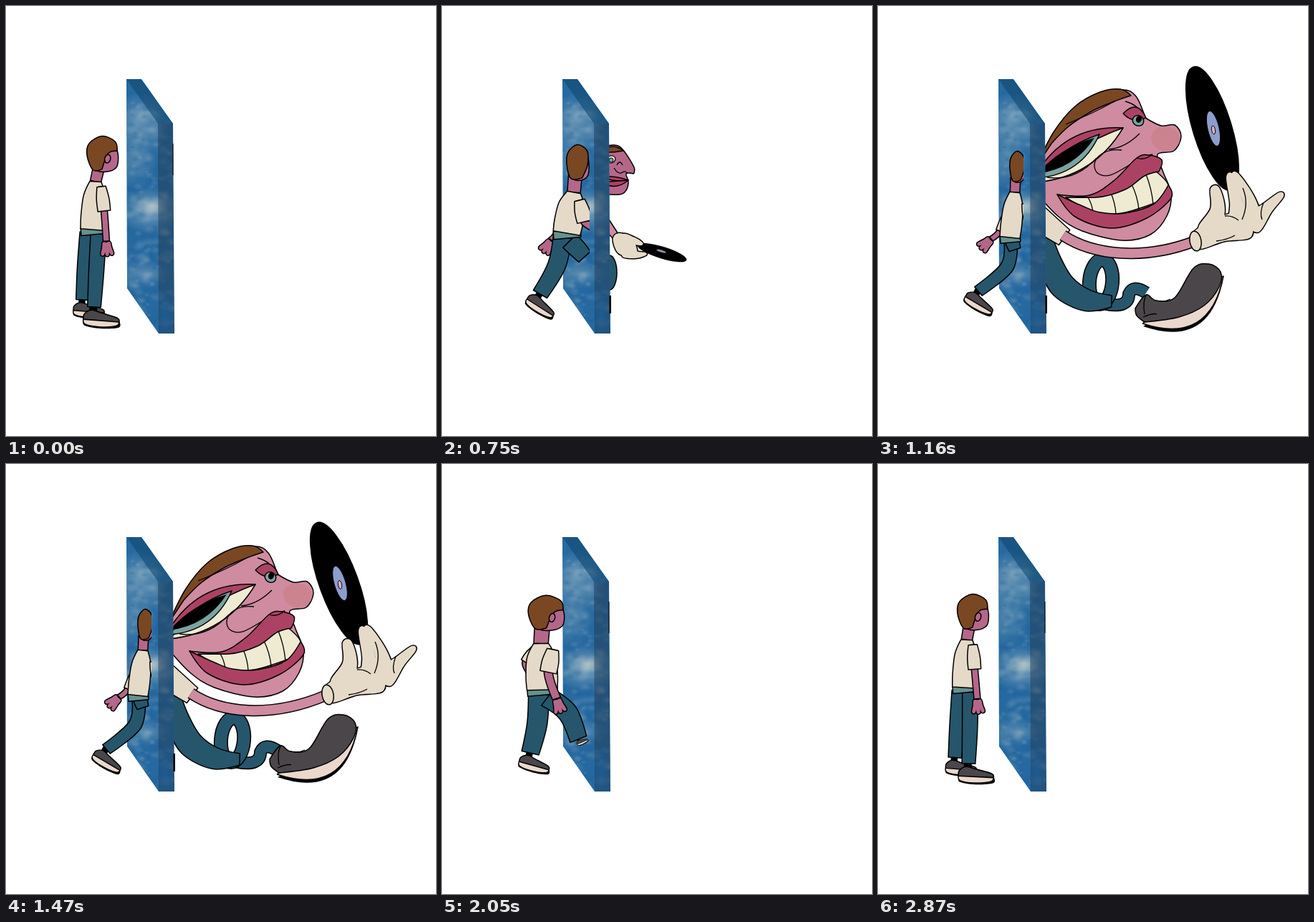
These frames come from a looping animation (600 px wide and 600 px high, 2.94 s). An HTML page with a canvas:

```html
<!DOCTYPE html>
<html lang="en">
<head>
<meta charset="utf-8">
<title>Through the sky door</title>
<style>
html, body { margin: 0; width: 100%; height: 100%; overflow: hidden; background: #fff; }
canvas { display: block; width: 600px; height: 600px; }
</style>
</head>
<body>
<canvas id="stage" width="600" height="600"></canvas>
<script>
const ctx = document.getElementById('stage').getContext('2d');
const SKIN = '#b5678a', ROSE = '#cf8ba0', LIP = '#ac4263', HAIR = '#7a4723', CLOTH = '#e5dac8',
  DENIM = '#26566b', HEM = '#66918f', SHOE = '#4a464a', SOLE = '#ead8cd', TOOTH = '#eeebd2', IRIS = '#7ba3a2';

const clamp = v => Math.min(1, Math.max(0, v));
const mix = (a, b, u) => a + (b - a) * u;

function paint(path, fill, width = 1.5) {
  if (fill) { ctx.fillStyle = fill; ctx.fill(path); }
  if (width) { ctx.lineWidth = width; ctx.stroke(path); }
}
// Smooth closed curve through points; sharp points keep their corner.
function outline(pts) {
  const path = new Path2D(), n = pts.length, at = i => pts[(i + n) % n];
  path.moveTo(pts[0].x, pts[0].y);
  for (let i = 0; i < n; i++) {
    const o = at(i - 1), a = at(i), b = at(i + 1), c = at(i + 2);
    const ka = a.sharp ? 0 : 1 / 6, kb = b.sharp ? 0 : 1 / 6;
    path.bezierCurveTo(a.x + (b.x - o.x) * ka, a.y + (b.y - o.y) * ka,
      b.x - (c.x - a.x) * kb, b.y - (c.y - a.y) * kb, b.x, b.y);
  }
  path.closePath();
  return path;
}
// Points as "x,y", with "!" for a corner.
const blob = (s, fill, width) => paint(outline(s.split(' ').map(p => {
  const [x, y] = p.replace('!', '').split(',').map(Number);
  return { x, y, sharp: p.endsWith('!') };
})), fill, width);

// Tapered tube along a spine of [x, y, radius].
function limbPath(spine, round) {
  const sides = [[], []], last = spine.length - 1;
  spine.forEach(([x, y, r], i) => {
    const p = spine[Math.max(0, i - 1)], q = spine[Math.min(last, i + 1)];
    const dx = q[0] - p[0], dy = q[1] - p[1], len = Math.hypot(dx, dy) || 1;
    const sharp = !round && (i === 0 || i === last);
    sides.forEach((side, n) => {
      const k = (n ? -r : r) / len;
      side.push({ x: x + dy * k, y: y - dx * k, sharp });
    });
  });
  return outline([...sides[0], ...sides[1].reverse()]);
}
const limb = (spine, fill, width) => paint(limbPath(spine), fill, width);
// Several limbs sharing one outer line.
function joined(spines, fill) {
  const paths = spines.map(s => limbPath(s, true));
  paths.forEach(p => paint(p, null, 3));
  paths.forEach(p => paint(p, fill, 0));
}
// Two arcs between two points, each with its own bulge.
function lens(x1, y1, x2, y2, up, down, fill, width) {
  const path = new Path2D(), dx = x2 - x1, dy = y2 - y1, len = Math.hypot(dx, dy);
  const bend = b => [(x1 + x2) / 2 + dy / len * b * 2, (y1 + y2) / 2 - dx / len * b * 2];
  path.moveTo(x1, y1);
  path.quadraticCurveTo(...bend(up), x2, y2);
  path.quadraticCurveTo(...bend(down), x1, y1);
  paint(path, fill, width);
}
function oval(x, y, rx, ry, deg, fill, width) {
  const path = new Path2D();
  path.ellipse(x, y, rx, ry, deg * Math.PI / 180, 0, 7);
  paint(path, fill, width);
}
const line = (d, width = 1.3) => paint(new Path2D(d), null, width);
function tube(d, width, color) {
  const path = new Path2D(d);
  paint(path, null, width + 3);
  ctx.strokeStyle = color;
  paint(path, null, width);
  ctx.strokeStyle = '#000';
}
function shifted(x, y, draw) {
  ctx.save(); ctx.translate(x, y); draw(); ctx.restore();
}

// Poses: build is width, turn of the head, clip edge; arms and legs list their
// three joints; feet are angle and size.
const STAND = { build: [16, 1, 216], head: [134, 206, 21, 24], neck: [125, 245], hip: [120, 312],
  near: [133, 252, 137, 286, 140, 328], far: [124, 256, 118, 275, 122, 290],
  back: [114, 316, 110, 365, 107, 410], front: [129, 318, 126, 370, 123, 420], feet: [2, .95, 2, 1.1] };
const ENTER = { build: [19, .1, 206], head: [189, 218, 15, 24], neck: [184, 260], hip: [174, 317],
  near: [192, 271, 199, 301, 232, 318], far: [168, 280, 163, 313, 153, 327],
  back: [168, 322, 160, 362, 137, 402], front: [178, 328, 189, 339, 199, 350], feet: [30, .95, -40, 0] };
const INSIDE = { build: [14, 0, 203], head: [194, 224, 10, 21], neck: [191, 260], hip: [184, 323],
  near: [206, 275, 212, 300, 234, 318], far: [180, 288, 170, 314, 158, 325],
  back: [185, 328, 180, 364, 140, 398], front: [187, 328, 189, 334, 191, 340], feet: [28, .95, -40, 0] };
const PULL = { build: [24, .85, 216], head: [172, 207, 27, 22], neck: [158, 251], hip: [155, 317],
  near: [177, 261, 176, 291, 188, 331], far: [150, 260, 138, 270, 143, 280],
  back: [149, 322, 143, 365, 131, 402], front: [164, 328, 190, 344, 206, 377], feet: [20, .95, -30, 0] };
const STEP = { build: [17, 1, 216], head: [106, 208, 20, 26], neck: [110, 250], hip: [118, 313],
  near: [123, 256, 109, 290, 120, 322], far: [102, 256, 89, 288, 97, 306],
  back: [115, 320, 118, 360, 112, 405], front: [124, 322, 155, 352, 168, 394], feet: [3, .95, -20, .85] };
const KEYS = [[0, STAND], [750, ENTER], [1160, INSIDE], [1640, INSIDE], [1810, PULL], [2390, STEP], [2910, STAND], [2940, STAND]];

function poseAt(t) {
  const i = KEYS.findIndex(k => k[0] > t) - 1;
  const [t0, a] = KEYS[i], [t1, b] = KEYS[i + 1], u = (t - t0) / (t1 - t0), pose = {};
  for (const part in a) pose[part] = a[part].map((v, n) => mix(v, b[part][n], u));
  return pose;
}

function shoe(x, y, deg, size) {
  ctx.save();
  ctx.translate(x, y); ctx.rotate(deg * Math.PI / 180); ctx.scale(size, size);
  ctx.translate(-13, 18);
  ctx.fillStyle = '#000';
  ctx.fillRect(7, -22, 10, 12);
  blob('0,0! 46,0! 45,7 22,9 2,6', '#000', 0);
  blob('0,-3! 45,-1! 42,5 20,7 2,4', SOLE);
  blob('0,-2! 1,-9 10,-14 22,-11 43,-5 45,0!', SHOE);
  ctx.restore();
}
function leg([hx, hy, kx, ky, ax, ay], w, deg, size) {
  shoe(ax, ay, deg, size);
  limb([[hx, hy, w * .68], [kx, ky, w * .66], [ax, ay, w * .58]], DENIM);
}
function arm([sx, sy, ex, ey, wx, wy], w, sleeve) {
  const r = w * .28, dir = Math.atan2(wy - ey, wx - ex);
  limb([[sx, sy, r], [ex, ey, r], [wx, wy, r]], SKIN);
  joined([-1, 0, 1].map(i => [3, 11, 20].map((d, n) =>
    [wx + d * Math.cos(dir + i * .35), wy + d * Math.sin(dir + i * .35), 4 - n])), SKIN);
  limb([[sx, sy, sleeve * .7], [mix(sx, ex, .5), mix(sy, ey, .5), sleeve], [ex, ey, sleeve]], CLOTH);
}
function boyHead([x, y, rx, ry], turn, [nx, ny], w) {
  const at = list => outline(list.map(([u, v, sharp]) => ({ x: x + u * rx, y: y + v * ry, sharp })));
  limb([[x - rx * .2, y + ry * .75, w * .5], [nx, ny, w * .48]], SKIN);
  paint(at([[-.4, .9], [0, -.2], [.98, -.3, true], [1.08, .25], [.95, .8], [.3, 1.05]]), SKIN);
  paint(at([[-.6, .95], [-1, .1], [-.85, -.6], [0, -1.02], [.87, -.7], [1, -.15, turn > .5],
    [mix(.95, .4, turn), mix(.3, 0, turn)], [mix(.5, 0, turn), .9, true]]), HAIR);
  if (turn > .5) oval(x + rx * .37, y + ry * .3, 4, 6, 15, SKIN);
}
function boy(t) {
  const { build: [w, turn, edge], head, neck, hip, near, far, back, front, feet } = poseAt(t);
  const [nx, ny] = neck, [hx, hy] = hip;
  ctx.save();
  ctx.beginPath(); ctx.rect(0, 0, edge, 600); ctx.clip();
  arm(far, w, w * .4);
  leg(back, w, feet[0], feet[1]);
  leg(front, w, feet[2], feet[3]);
  limb([[hx, hy - 4, w], [hx + 1, hy + 7, w]], HEM);
  boyHead(head, turn, neck, w);
  limb([[nx, ny, w * .5], [mix(nx, hx, .3), mix(ny, hy, .3), w * .95], [mix(nx, hx, .7), mix(ny, hy, .7), w * 1.05], [hx, hy, w]], CLOTH);
  arm(near, w, w * .55);
  ctx.restore();
}

// First glimpse behind the door.
function peek() {
  oval(234, 372, 10, 24, 0, DENIM);
  blob('222,197! 240,194 252,200 268,225 267,234! 257,234 260,245 257,257 248,263 222,262!', SKIN);
  lens(222, 204, 253, 202, 7, -1, HAIR);
  oval(236, 214, 6, 5, -20, TOOTH, 1.2);
  oval(236, 215, 3, 3, 0, IRIS, 1);
  line('M240 226 Q246 236 252 232 M244 222 Q248 214 252 222 M252 232 Q257 229 258 234');
  lens(222, 238, 260, 243, 2, -3, LIP);
  lens(222, 246, 260, 243, 0, -7, LIP);
  limb([[226, 300, 7], [242, 321, 5]], ROSE);
  oval(307, 344, 35, 7.5, 17, '#000');
  oval(306, 342, 7, 1.6, 17, '#8b92ac', 0);
  joined([[[243, 321, 6], [256, 335, 14], [270, 347, 4]], [[252, 326, 8], [268, 328, 5], [279, 332, 2]], [[255, 341, 9], [270, 347, 5], [284, 346, 2]]], CLOTH);
}

function eyes() {
  lens(222, 232, 342, 170, 20, -5, LIP);
  lens(222, 246, 342, 170, 8, -18, TOOTH);
  lens(222, 240, 309, 179, 8, -16, IRIS);
  lens(222, 234, 302, 184, 7, -11, '#000', 0);
  line('M236 239 Q275 245 305 212 M262 165 Q300 150 330 133 M345 133 Q356 136 362 142');
  lens(342, 150, 374, 156, 12, -6, LIP);
  oval(363, 160, 8, 7, 30, IRIS);
  oval(364, 158, 4, 5, 20, '#000', 0);
}
function mouth() {
  blob('262,267! 305,266 340,256 372,236 388,231! 405,250 394,272! 340,289 300,287', TOOTH);
  line('M293 267 Q298 275 300 287 M325 261 Q331 275 332 290 M354 249 Q362 265 364 284 M374 235 Q382 255 384 277');
  blob('250,263! 295,264 330,243 361,212 378,208 396,215 392,231! 372,237 345,256 305,267', LIP);
  blob('250,263! 285,279 310,288 345,289 385,276 405,250! 409,268 375,296 325,310 275,294', LIP);
  line('M361 212 Q372 216 383 207');
}
function head() {
  blob('222,225! 244,182 275,146 310,125 342,117 360,126 373,156! 395,167 414,166 423,182 413,202 390,207 398,232 409,262 403,293 380,319 340,327 285,314 252,294 222,262!', ROSE);
  blob('222,222! 245,176 275,140 310,120 338,116 353,125! 330,133 298,147 266,168 242,192!', HAIR);
  eyes();
  oval(401, 185, 20, 17, 10, '#cb838f', 0);
  line('M305 232 C294 215 314 198 340 201 M305 232 C325 250 350 214 383 207 M322 200 Q345 198 365 178');
  mouth();
}
function glove() {
  joined([
    [[442, 329, 11], [478, 312, 17], [518, 305, 17]],
    [[460, 316, 14], [474, 284, 10], [470, 254, 6]],
    [[504, 308, 14], [500, 274, 9], [491, 237, 5]],
    [[522, 308, 14], [518, 272, 9], [498, 236, 5]],
    [[520, 306, 14], [544, 281, 8], [563, 263, 4]],
  ], CLOTH);
  line('M484 293 Q494 292 503 299 M509 254 Q518 275 508 298 M538 274 Q532 290 536 298 M472 328 Q488 326 498 320');
  oval(443, 328, 8, 14, -10, CLOTH);
}
function bigShoe() {
  lens(370, 447, 481, 384, 0, -36, '#000', 0);
  lens(369, 443, 482, 377, 0, -37, SOLE);
  blob('359,422! 374,403 388,411 414,407 440,366 462,360 478,371 476,392 455,418 420,434 372,441! 361,432', SHOE);
  line('M374 403 Q369 414 372 430 M370 434 Q384 428 389 430 M388 411 Q398 414 408 409');
}
function giant(t) {
  const k = clamp((t - 1160) / 310), reach = 73 - 3 * k;
  shifted(5 * k, 0, () => {
    tube('M318 416 Q350 422 350 402 Q356 388 374 400', 15, DENIM);
    oval(311, 385, 16, 31, 5, null, 20);
    ctx.strokeStyle = DENIM;
    oval(311, 385, 16, 31, 5, null, 17);
    ctx.strokeStyle = '#000';
  });
  limb([[224, 320, 18], [238, 355, 17], [258, 391, 18], [292, 411, 15], [326, 412, 8]], DENIM);
  shifted(9 * k, -10 * k, bigShoe);
  limb([[222, 295, 18], [260, 323, 13]], CLOTH);
  tube(`M258 320 C300 348 370 355 ${440 + 6 * k} ${329 - 6 * k}`, 13, ROSE);
  shifted(6 * k, -2 * k, head);
  shifted(-2 * k, -4.5 * k, () => {
    oval(466.5, 171, 90, 27, reach, '#000');
    oval(468, 171, 25, 8, reach + 4, '#8e9dcc', 1);
    oval(468, 173, 6, 2.5, 80, '#d9b4c4', 1);
  });
  shifted(6 * k, -6 * k, glove);
}

// Pulled back so fast that everything stretches.
function smear() {
  const foot = [[222, 340, 22], [262, 383, 14], [302, 411, 5]];
  limb(foot.map(([x, y, r]) => [x - 3, y + 7, r]), SOLE);
  limb(foot, SHOE);
  blob('222,194! 250,189 272,197 300,198 318,196 325,205 314,216 300,221! 307,238 305,253 292,269 265,277 222,270!', ROSE);
  lens(222, 200, 280, 198, 8, 0, HAIR);
  lens(244, 206, 290, 202, 6, -4, TOOTH);
  lens(246, 205, 276, 199, 5, -5, IRIS);
  lens(254, 201, 276, 197, 4, -1, '#000', 0);
  lens(222, 258, 298, 246, 5, -10, TOOTH);
  lens(222, 250, 306, 224, -2, -13, LIP);
  lens(222, 266, 306, 248, -7, -17, LIP);
  line('M282 249 L283 259 M238 234 Q270 228 300 221');
  limb([[222, 300, 8], [248, 314, 5]], ROSE);
  joined([[[266, 334, 6], [310, 343, 11], [360, 342, 12], [405, 329, 5]]], '#000');
  joined([[[226, 316, 6], [248, 325, 8], [268, 334, 6]]], CLOTH);
}
const streaks = () => line('M253 184 Q278 176 292 160 M329 194 L372 185 M307 234 Q335 227 362 220 M465 254 Q450 300 411 325 M454 293 Q435 335 398 346 M305 410 L353 418 M336 431 Q375 434 404 424', 1);

function visitor(t) {
  if (t < 580 || t >= 2020) return;
  let draw = peek, sx = clamp((t - 540) / 210), sy = 1;
  if (t >= 1800) {
    draw = smear;
    sx = 1 - (t - 1810) / 210;
    sy = mix(.8, 1, sx);
    if (sx === 1) streaks();
  } else if (t >= 800) {
    draw = giant;
    sx = t > 1700 ? .72 : 1 - (1 - clamp((t - 700) / 460)) ** 2;
    sy = sx * (1 + .05 * clamp((t - 1500) / 140));
  }
  ctx.save();
  ctx.translate(234, 290); ctx.scale(sx, sy); ctx.translate(-234, -290);
  draw(t);
  ctx.restore();
}

function makeDoor() {
  const door = document.createElement('canvas');
  door.width = door.height = 600;
  const g = door.getContext('2d');
  let seed = 11;
  const rand = () => (seed = seed * 16807 % 2147483647) / 2147483647;
  const face = (d, fill) => { g.fillStyle = fill; g.fill(new Path2D(d)); };
  const puff = (x, y, rx, ry, rgb, alpha) => {
    g.save();
    g.translate(x, y); g.scale(rx, ry);
    const soft = g.createRadialGradient(0, 0, 0, 0, 0, 1);
    soft.addColorStop(0, `rgba(${rgb},${alpha})`);
    soft.addColorStop(1, `rgba(${rgb},0)`);
    g.fillStyle = soft;
    g.fillRect(-1, -1, 2, 2);
    g.restore();
  };
  const LIGHT = '165,190,200';
  g.clip(new Path2D('M168 102H189L233 164L235 457H213L169 394Z'));
  g.fillStyle = '#2669a0';
  g.fillRect(160, 100, 80, 360);
  puff(190, 160, 40, 40, LIGHT, .6);
  puff(182, 212, 30, 45, LIGHT, .4);
  puff(200, 284, 48, 32, LIGHT, .65);
  puff(190, 374, 45, 20, LIGHT, .4);
  for (let i = 0; i < 300; i++) {
    const r = 2 + rand() * 6;
    puff(165 + rand() * 70, 130 + rand() * 325, r * 1.4, r, rand() < .5 ? LIGHT : '20,90,150', .2);
  }
  puff(203, 279, 22, 15, '208,214,206', .65);
  face('M168 102H189L233 164H212Z', 'rgba(16,72,112,.6)');
  face('M212 164H233L235 457H213Z', 'rgba(32,55,78,.48)');
  puff(222, 430, 14, 45, '25,98,160', .6);
  return door;
}
const door = makeDoor();

function render(t) {
  ctx.fillStyle = '#fff';
  ctx.fillRect(0, 0, 600, 600);
  ctx.strokeStyle = '#000';
  ctx.lineJoin = 'round';
  visitor(t);
  ctx.drawImage(door, 0, 0);
  ctx.fillStyle = '#000';
  if (t >= 650 && t < 2020) ctx.fillRect(233.5, 404, 2.5, 25);
  else ctx.fillRect(232.5, 192, 1, 44);
  boy(t);
}

// Drawings last 70 ms, two in five of them 100 ms.
const LOOP = 2940;
const startOf = i => 70 * i + 30 * Math.floor((2 * i + 2) / 5);
const begin = performance.now();
let shown = -1;
function tick() {
  const t = (performance.now() - begin) % LOOP;
  let i = 0;
  while (startOf(i + 1) <= t) i++;
  if (i !== shown) render(startOf(shown = i));
  requestAnimationFrame(tick);
}
tick();
</script>
</body>
</html>
```
